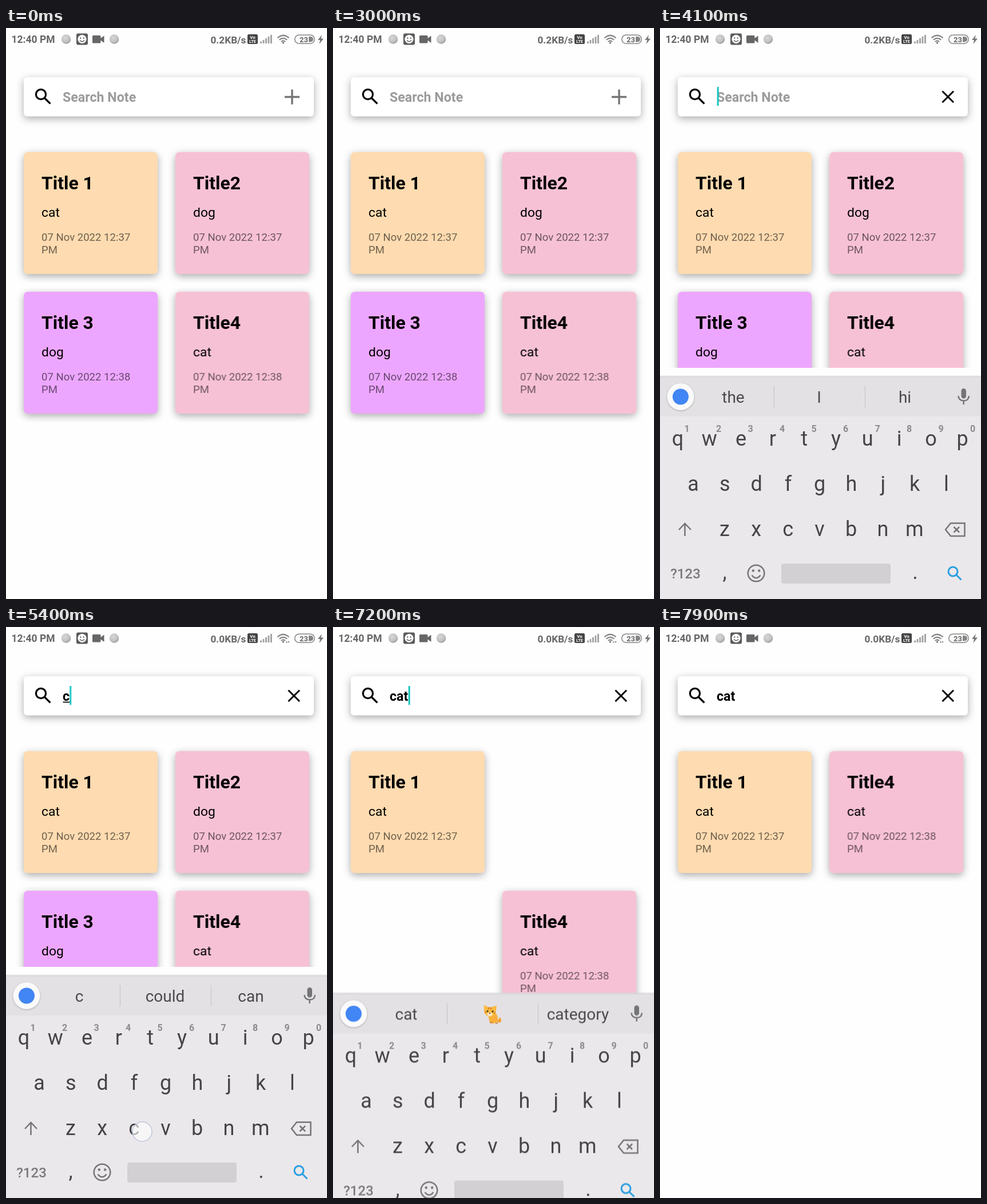
These frames come from a looping animation (561x998 px, 8 s). An HTML page:

```html
<!DOCTYPE html>
<html lang="en">
<head>
<meta charset="utf-8">
<title>Note search</title>
<style>
  html, body { margin: 0; width: 100%; height: 100%; overflow: hidden; background: #fefefe; }
  svg { display: block; font-family: Roboto, sans-serif; }
  .stage { width: 561px; height: 998px; }
  .lift { filter: drop-shadow(0 4px 7px rgba(0, 0, 0, .33)); }
  .status text { font-weight: 700; fill: #666; }
  .title { font-size: 31.9px; font-weight: 700; }
  .body { font-size: 22.86px; }
  .date { font-size: 18.57px; fill-opacity: .56; }
  .query text { font-size: 23.2px; font-weight: 700; }
  .keys { font-size: 36px; fill: #454446; text-anchor: middle; }
  .digit { font-size: 16px; font-weight: 700; fill: #8c8a8d; }
  .word { font-size: 28px; fill: #4a494b; text-anchor: middle; }
  .line { fill: none; stroke-linecap: butt; }
  .tap { fill: rgba(255, 255, 255, .6); stroke: #bfc7dc; stroke-width: 1.5; }

  .keyboard { animation: keyboard 8s linear infinite; }
  .gone { animation: fade 8s linear infinite; }
  .moved { animation: move 8s linear infinite; }
  .caret { animation: caret 8s step-end infinite; }

  @keyframes keyboard {
    0% { transform: translateY(396px); }
    40.04% { transform: translateY(396px); }
    40.05% { transform: translateY(389px); animation-timing-function: cubic-bezier(.5, 1, .89, 1); }
    42.8% { transform: none; }
    89.375% { transform: none; animation-timing-function: cubic-bezier(.11, 0, .5, 0); }
    91.625%, 100% { transform: translateY(396px); }
  }
  @keyframes fade {
    0%, 88.4% { opacity: 1; }
    89.9%, 100% { opacity: 0; }
  }
  @keyframes move {
    0%, 90.16% { transform: none; animation-timing-function: cubic-bezier(.37, 0, .63, 1); }
    93.29%, 100% { transform: translateY(-244px); }
  }
  @keyframes caret {
    0% { transform: none; }
    66.25% { transform: translateX(11.5px); }
    71.25% { transform: translateX(24px); }
    74.75% { transform: translateX(32px); }
  }
</style>
</head>
<body>
<svg class="stage" viewBox="0 0 561 998" xmlns="http://www.w3.org/2000/svg">
  <defs>
    <radialGradient id="ball" cx=".4" cy=".35" r=".65">
      <stop offset="0" stop-color="#d6d6d6"/><stop offset=".7" stop-color="#c2c2c2"/><stop offset="1" stop-color="#999"/>
    </radialGradient>
  </defs>
  <rect width="561" height="998" fill="#fefefe"/>

  <g id="list"></g>
  <rect y="594" width="561" height="404" fill="#fefefe" data-on="3200-7080"/>

  <g class="query">
    <rect class="lift" x="31" y="86" width="507" height="68.5" rx="6" fill="#fff"/>
    <g class="line" stroke="#000" stroke-width="3.2">
      <circle cx="61" cy="116" r="8.6"/><path d="M67 122L77.5 132.3"/>
    </g>
    <path class="line" d="M487 120.5H513M500 107.5V133.5" stroke="#757575" stroke-width="3.4" data-on="0-3100"/>
    <path class="line" d="M493.5 110.5L513 130M513 110.5L493.5 130" stroke="#000" stroke-width="3" data-on="3100-8000"/>
    <text x="99" y="128.5" fill="#9b9b9b" data-on="0-5300">Search Note</text>
    <text x="99" y="128.5" data-on="5300-5700">c</text>
    <text x="99" y="128.5" data-on="5700-5980">ca</text>
    <text x="99" y="128.5" data-on="5980-8000">cat</text>
    <rect x="99.5" y="130.5" width="12.5" height="1.7" data-on="5300-5700"/>
    <rect x="99.5" y="130.5" width="25" height="1.7" data-on="5700-5980"/>
    <rect x="99.5" y="130.5" width="33" height="1.7" data-on="5980-6990"/>
    <g data-on="3100-3600 4100-4600 5100-6480 6990-7490">
      <rect class="caret" x="99.7" y="103" width="3" height="33" fill="#17c6bf"/>
    </g>
  </g>

  <g class="status">
    <text x="9.5" y="26" font-size="17.5">12:40 PM</text>
    <circle cx="105" cy="19.5" r="8.2" fill="url(#ball)"/>
    <circle cx="189" cy="19.5" r="8.2" fill="url(#ball)"/>
    <rect x="123" y="9.5" width="20" height="20" rx="3" fill="#5c5c5c"/>
    <circle cx="133" cy="19.5" r="7.6" fill="#fff"/>
    <circle cx="130.3" cy="17.6" r="1.2" fill="#5c5c5c"/><circle cx="135.7" cy="17.6" r="1.2" fill="#5c5c5c"/>
    <path class="line" d="M129 21.5Q133 26 137 21.5" stroke="#5c5c5c" stroke-width="1.4"/>
    <path d="M152.5 13H164Q165.5 13 165.5 14.5V18L171.500 13.500V26L165.500 21.500V25Q165.500 26.500 164 26.500H152.500Q151 26.500 151 25V14.500Q151 13 152.500 13Z" fill="#666"/>
    <text x="357.5" y="26.500" font-size="17.200" data-on="0-4300">0.2KB/s</text>
    <text x="357.5" y="26.500" font-size="17.200" data-on="4300-8000">0.0KB/s</text>
    <rect x="422" y="11" width="18" height="17" rx="2.500" fill="#444"/>
    <g font-size="8" text-anchor="middle">
      <text x="431" y="18.700" style="fill:#fff">Vo</text><text x="431" y="26.300" style="fill:#fff" font-size="7.500">LTE</text>
    </g>
    <path class="line" d="M445.500 27V23.500M450 27V21M454.500 27V18M459 27V15M463.500 27V12" stroke="#a0a0a0" stroke-width="2.800"/>
    <g class="line" stroke="#858585" stroke-width="2.200">
      <path d="M474.500 17.500Q484.500 8.500 494.500 17.500M477.700 20.800Q484.500 14.800 491.300 20.800M480.800 24Q484.500 20.800 488.200 24"/>
    </g>
    <circle cx="484.500" cy="26" r="1.700" fill="#777"/>
    <path d="M490.500 24.500L492 27.500H489ZM494 28L495.500 25H492.500Z" fill="#777" data-on="4300-8000"/>
    <rect x="504.700" y="12.200" width="34.500" height="15" rx="7.500" fill="none" stroke="#858585" stroke-width="1.500"/>
    <text x="513" y="24.500" font-size="13">23</text>
    <path d="M529 15H532Q537 15.500 537 19.700T532 24.500H529Z" fill="#858585"/>
    <path d="M552 12L545 21H549L547.500 28L555 18.500H550.500Z" fill="#777"/>
  </g>

  <g class="keyboard">
    <rect y="607.500" width="561" height="2" fill="#d9d8da" opacity=".6"/>
    <rect y="609" width="561" height="395" fill="#ebe8eb"/>
    <rect y="609" width="561" height="70" fill="#e3e1e3"/>
    <rect y="609" width="561" height="1.500" fill="#d8d6d9"/>
    <circle cx="36" cy="644.500" r="23.500" fill="#fafafa" style="filter:drop-shadow(0 1px 1.5px rgba(0,0,0,.25))"/>
    <circle cx="36" cy="644.500" r="14" fill="#4285f4"/>
    <path d="M199.500 626V663M358.500 626V663" stroke="#cac8cb" stroke-width="1.300"/>
    <rect x="526.500" y="630" width="8.500" height="17.500" rx="4.250" fill="#757476"/>
    <path class="line" d="M521.500 643Q522 651.500 530.700 651.500T540 643M530.700 651.500V658" stroke="#757476" stroke-width="2.500"/>
    <g id="words"></g>
    <g data-on="5980-8000">
      <path d="M285 655Q295 662 291 652" class="line" stroke="#f2a02d" stroke-width="4"/>
      <ellipse cx="280" cy="652" rx="8" ry="9.500" fill="#f8b03a"/>
      <path d="M264 640V629L271 633H277L286 630L284.500 642Q282 650 274 650Q266 649 264 640Z" fill="#fbb93f"/>
      <path d="M272 633V637M276 633V637M265 642H268M281 643H284M279 660H274M284 661H288" stroke="#c8681b" stroke-width="1.500"/>
      <circle cx="270" cy="640" r="1.600" fill="#3c2b20"/><circle cx="279" cy="640.500" r="1.600" fill="#3c2b20"/>
      <ellipse cx="274" cy="645.500" rx="4.500" ry="3" fill="#fff0d0"/>
      <circle cx="274" cy="644" r="1.200" fill="#6b4230"/>
    </g>
    <g class="keys" id="keys"></g>
    <g class="line" stroke="#757476" stroke-width="2.500">
      <path d="M43.500 888V866M33 877L43.500 866L54 877"/>
      <path d="M508 865.500H532.500V888H508L499 876.800ZM513.500 872L523 881.500M523 872L513.500 881.500"/>
      <circle cx="168" cy="953" r="14.300"/><path d="M160.500 956.500Q168 966 175.500 956.500"/>
    </g>
    <circle cx="162.800" cy="948.500" r="2.200" fill="#757476"/><circle cx="173.200" cy="948.500" r="2.200" fill="#757476"/>
    <text x="44.500" y="961.500" font-size="24" font-weight="500" fill="#7b797c" text-anchor="middle">?123</text>
    <rect x="212" y="936" width="191" height="35" rx="4" fill="#d2d0d3"/>
    <g class="line" stroke="#2b9fe0" stroke-width="3">
      <circle cx="512" cy="950" r="8"/><path d="M517.500 955.500L526.500 964.500"/>
    </g>
  </g>

  <circle class="tap" cx="238" cy="882" r="17" data-on="5180-5480"/>
  <circle class="tap" cx="62" cy="803" r="17" data-on="5620-5790"/>
  <circle class="tap" cx="257" cy="724" r="17" data-on="5890-6080"/>
  <circle class="tap" cx="510" cy="950" r="17" data-on="6960-7140"/>
</svg>

<script>
  const byId = id => document.getElementById(id);
  const label = (x, y, text, attrs = '') => `<text x="${x}" y="${y}" ${attrs}>${text}</text>`;

  const ORANGE = '#fedbb0', PINK = '#f7c1d5', PURPLE = '#eda6ff';
  const card = (col, row, color, title, body, minute, cls = '') => `
    <g class="${cls}"><svg x="${15.5 + 265 * col}" y="${201 + 244 * row}" width="265" height="244">
      <rect class="lift" x="15.5" y="16" width="234" height="213" rx="7" fill="${color}"/>
      ${label(46.5, 80.5, title, 'class="title"')}
      ${label(46.5, 128.5, body, 'class="body"')}
      ${label(46.5, 170.5, '07 Nov 2022 12:' + minute, 'class="date"')}
      ${label(46.5, 192.5, 'PM', 'class="date"')}
    </svg></g>`;
  byId('list').innerHTML =
    card(0, 0, ORANGE, 'Title 1', 'cat', 37) +
    card(1, 0, PINK, 'Title2', 'dog', 37, 'gone') +
    card(0, 1, PURPLE, 'Title 3', 'dog', 38, 'gone') +
    card(1, 1, PINK, 'Title4', 'cat', 38, 'moved');

  const row = (letters, x, y) =>
    [...letters].map((ch, i) => label(x + 55.3 * i, y, ch)).join('');
  const digits = [...'1234567890']
    .map((d, i) => label(47 + 55.5 * i, 706, d, 'class="digit"')).join('');
  byId('keys').innerHTML = row('qwertyuiop', 31, 730) + digits +
    row('asdfghjkl', 58, 809) + row('zxcvbnm', 113, 888) +
    label(113, 963, ',') + label(446, 963, '.');

  const suggestions = [
    ['0-5300', 'the', 'I', 'hi'],
    ['5300-5700', 'c', 'could', 'can'],
    ['5700-5980', 'ca', 'can', 'cat'],
    ['5980-8000', 'cat', '', 'category']
  ];
  byId('words').innerHTML = suggestions.map(([on, ...words]) =>
    `<g class="word" data-on="${on}">` +
    words.map((w, i) => label(128 + 150 * i, 655, w)).join('') + '</g>').join('');

  // Each data-on holds "start-end" windows in ms within the loop.
  const LOOP = 8000;
  for (const el of document.querySelectorAll('[data-on]')) {
    const frames = [];
    const add = (ms, opacity) => frames.push({ offset: ms / LOOP, opacity, easing: 'step-end' });
    const spans = el.dataset.on.split(' ').map(s => s.split('-').map(Number));
    if (spans[0][0] > 0) add(0, 0);
    for (const [from, to] of spans) {
      add(from, 1);
      if (to < LOOP) add(to, 0);
    }
    add(LOOP, frames[frames.length - 1].opacity);
    el.animate(frames, { duration: LOOP, iterations: Infinity });
  }
</script>
</body>
</html>
```
